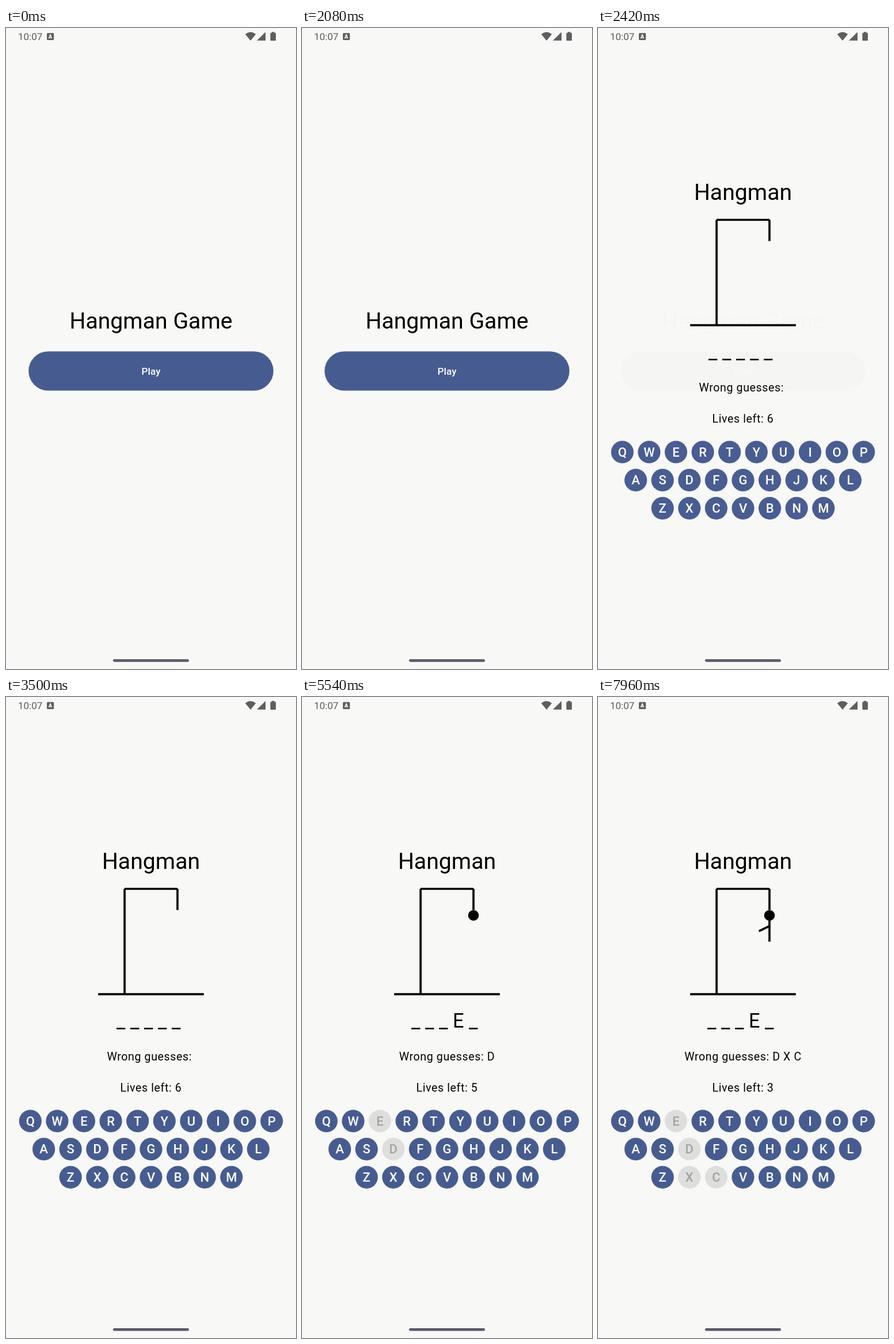
An HTML page for the animation above (8 s loop, 504 px wide and 1111 px high).

```html
<!DOCTYPE html>
<html lang="en">
<head>
<meta charset="utf-8">
<title>Hangman</title>
<style>
  html, body { margin: 0; width: 100%; height: 100%; overflow: hidden; background: #f8f8f6; }
  svg { display: block; width: 504px; height: 1111px; }
  text { font-family: Roboto, sans-serif; text-anchor: middle; white-space: pre; }
  .title { font-size: 39.2px; }
  .body { font-size: 19.6px; letter-spacing: .6px; }
  .key circle { fill: #465c91; }
  .key text { fill: #fff; font-size: 22px; font-weight: 500; }
  .key.used circle { fill: #dededd; }
  .key.used text { fill: #a3a3a4; }
</style>
</head>
<body>
<svg viewBox="0 0 504 1111">
  <g id="status" fill="#5e5e60">
    <text x="21" y="20.7" font-size="17" style="text-anchor:start">10:07</text>
    <rect x="71" y="8.7" width="12.2" height="12.2" rx="1.6"/>
    <text x="77.1" y="18.4" font-size="9.5" font-weight="900" fill="#f8f8f6">A</text>
    <path d="M415.8 10.8Q425 3.4 434.2 10.8L425 22Z"/>
    <path d="M451 7V21.8H436Z"/>
    <path d="M461.8 8.4V6.8H466.4V8.4H468Q469 8.4 469 9.4V21Q469 22 468 22H460.4Q459.4 22 459.4 21V9.4Q459.4 8.4 460.4 8.4Z"/>
  </g>
  <rect x="186" y="1094" width="132" height="4.8" rx="2.4" fill="#5d5b6b"/>

  <g id="menu">
    <text class="title" x="252" y="520.5">Hangman Game</text>
    <rect x="39.2" y="560.5" width="425.6" height="68" rx="34" fill="#465c91"/>
    <text x="252" y="600.6" font-size="17.1" font-weight="500" letter-spacing=".12" fill="#fff">Play</text>
  </g>

  <g id="game">
    <text class="title" x="252" y="297.5">Hangman</text>
    <g stroke="#000" stroke-width="3.7" fill="none">
      <path d="M160.2 515.2H343.8M206.1 515.2V332.5M206.1 332.5H298M298 332.5V369.3"/>
      <circle class="part" cx="298" cy="378.5" r="9.3" fill="#000" stroke="none"/>
      <path class="part" d="M298 387V424"/>
      <path class="part" d="M298 397L279.6 405.8"/>
    </g>
    <text id="word" x="252" y="572.6" font-size="34.3"></text>
    <text id="wrong" class="body" x="252" y="629.7"></text>
    <text id="lives" class="body" x="252" y="683.6"></text>
    <g id="keys"></g>
  </g>
</svg>
<script>
  const LOOP = 8000, OPEN = 2130, FADE = 320, ANSWER_AT = 3, ANSWER = "E", LENGTH = 5;
  const guesses = [["E", 3540], ["D", 5080], ["X", 6120], ["C", 7670]];
  const $ = id => document.getElementById(id);
  const parts = document.querySelectorAll(".part");
  const keys = {};

  $("keys").innerHTML = ["QWERTYUIOP", "ASDFGHJKL", "ZXCVBNM"].map((row, r) =>
    [...row].map((c, i) => {
      const x = 252 + (i - (row.length - 1) / 2) * 46.6, y = 735 + r * 48.65;
      return `<g class="key" transform="translate(${x} ${y})"><circle r="19.6"/><text y="7.7">${c}</text></g>`;
    }).join("")).join("");
  for (const key of $("keys").children) keys[key.textContent] = key;

  function draw(t) {
    const used = guesses.filter(([, at]) => t >= at).map(([c]) => c);
    const wrong = used.filter(c => c !== ANSWER);
    // The two screens cross-fade, slowing towards the end.
    const p = Math.min(1, Math.max(0, (t - OPEN) / FADE));
    const shown = 1 - (1 - p) ** 2;
    $("menu").style.opacity = 1 - shown;
    $("game").style.opacity = shown;
    for (const c in keys) keys[c].classList.toggle("used", used.includes(c));
    parts.forEach((part, i) => part.style.display = i < wrong.length ? "" : "none");
    $("word").textContent = Array.from({ length: LENGTH }, (_, i) =>
      i === ANSWER_AT && used.includes(ANSWER) ? "E " : "_ ").join("");
    $("wrong").textContent = "Wrong guesses: " + wrong.join(" ");
    $("lives").textContent = "Lives left: " + (6 - wrong.length);
  }

  const start = performance.now();
  function tick() {
    draw((performance.now() - start) % LOOP);
    requestAnimationFrame(tick);
  }
  tick();
</script>
</body>
</html>
```
